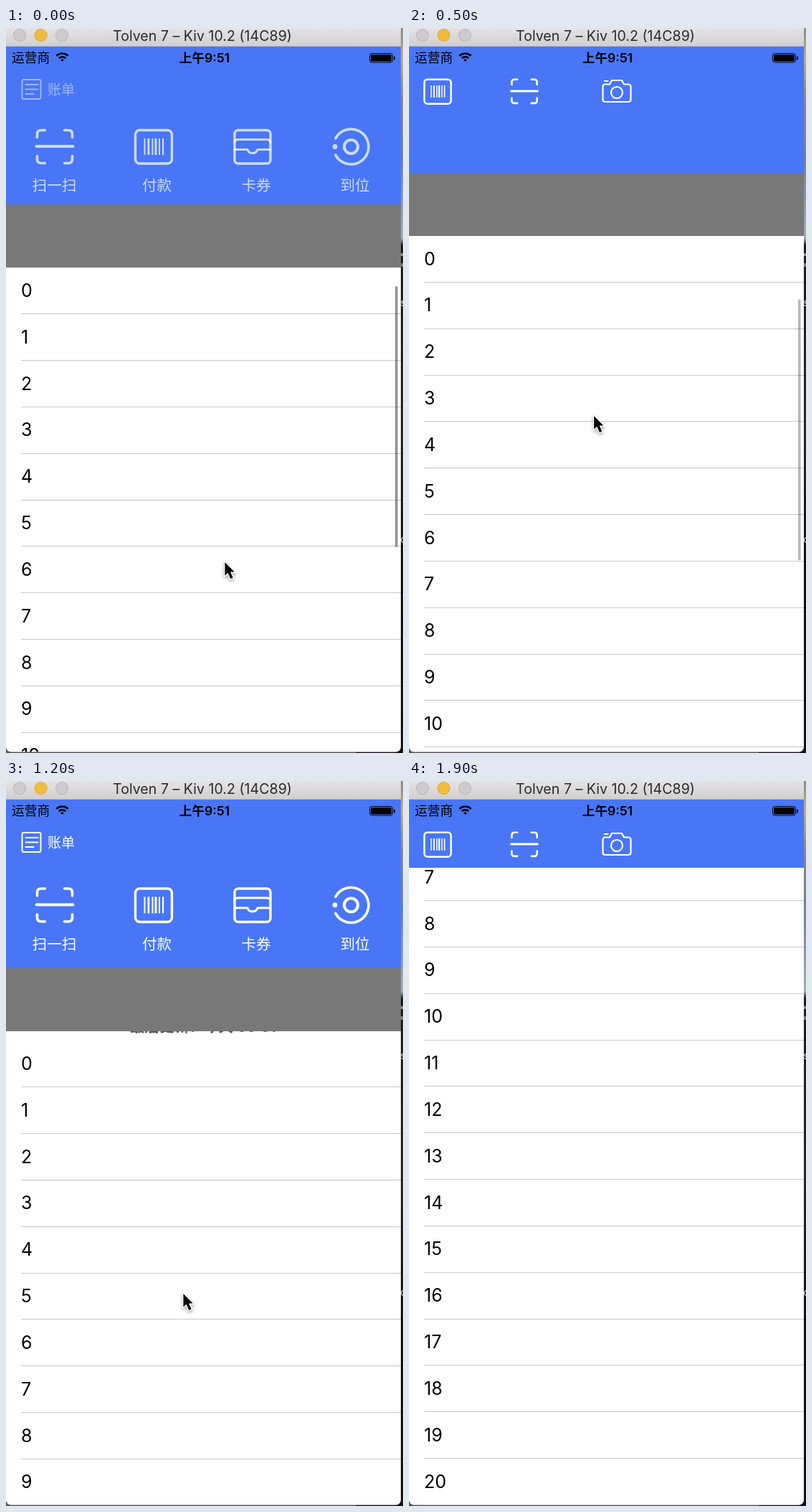
An HTML page with a canvas that plays this animation: 554 by 1011 pixels, repeating every 2 s.

```html
<!DOCTYPE html>
<html lang="zh-CN">
<head>
<meta charset="utf-8">
<style>
  html, body { margin: 0; width: 554px; height: 1011px; overflow: hidden; background: #111; }
  canvas { display: block; }
</style>
</head>
<body>
<canvas id="stage" width="554" height="1011"></canvas>
<script>
const c = document.getElementById('stage').getContext('2d');
const FAMILY = 'Inter, "Noto Sans CJK SC", "Noto Sans CJK", sans-serif';
const BLUE = '#4876f6', WIDTH = 551, ROW = 64.83;
const NAV_BOTTOM = 121, HEADER_BOTTOM = 261, LIST_TOP = 349;
const STEP = 100, STEPS = 20;

// step, scroll offset, pointer x, pointer y, scrollbar opacity
const KEYS = [
  [0, 15, 305, 744, .42], [2, 113, 308, 652, .2], [4, 89, 263, 577, .42],
  [7, 0, 247, 466, 0], [10, -40, 247, 690, 0], [12, -13, 247, 714, 0],
  [15, 705.5, 275, 508, .42], [18, 701, 275, 508, .15], [19, 701, 275, 508, 0]
];

function poseAt(step) {
  const i = Math.max(1, KEYS.findIndex(k => k[0] >= step));
  const a = KEYS[i - 1], b = KEYS[i], f = (step - a[0]) / (b[0] - a[0]);
  return a.map((v, n) => v + (b[n] - v) * f);
}

function rect(x, y, w, h, color) {
  c.fillStyle = color;
  c.fillRect(x, y, w, h);
}

function text(str, x, y, size, color, align = 'left', weight = 400) {
  c.font = `${weight} ${size}px ${FAMILY}`;
  c.textAlign = align;
  c.fillStyle = color;
  c.fillText(str, x, y);
}

function disc(x, y, r, color) {
  c.fillStyle = color;
  c.beginPath();
  c.arc(x, y, r, 0, 7);
  c.fill();
}

function box(x, y, w, h, r) {
  c.beginPath();
  c.roundRect(x, y, w, h, r);
}

function stroke(path, width) {
  c.lineWidth = width;
  c.stroke(new Path2D(path));
}

function clipped(x, y, w, h, draw) {
  c.save();
  c.beginPath();
  c.rect(x, y, w, h);
  c.clip();
  draw();
  c.restore();
}

// Icons are drawn around their own centre.
function icon(draw, x, y, scale = 1) {
  c.save();
  c.translate(x, y);
  c.scale(scale, scale);
  c.strokeStyle = c.fillStyle = '#fff';
  c.lineCap = c.lineJoin = 'round';
  draw();
  c.restore();
}

function scanIcon() {
  stroke('M-25.5 -.5H25.5', 4);
  for (const [sx, sy] of [[1, 1], [-1, 1], [1, -1], [-1, -1]]) {
    c.save();
    c.scale(sx, sy);
    stroke('M13.5 23H19Q24.5 23 24.5 17.5V13', 3.6);
    c.restore();
  }
}

function payIcon() {
  c.lineWidth = 3.4;
  box(-25.5, -23, 51, 46.5, 6);
  c.stroke();
  [[-13.5, 2], [-8.5, 2.8], [-2.5, 2], [1.5, 3], [7, 2], [12, 2.2]].forEach(([x, w]) => c.fillRect(x, -11.5, w, 23));
}

function cardIcon() {
  c.lineWidth = 3.4;
  box(-25, -23, 50, 46.5, 5);
  c.stroke();
  stroke('M-25 -6Q-24 -10 -20 -10H20Q24 -10 25 -6M-25 4H-7Q-5.5 9 0 9Q5.5 9 7 4H25', 3);
}

function placeIcon() {
  c.lineWidth = 3.6;
  c.beginPath();
  c.arc(0, 0, 24.5, -2.65, 2.65);
  c.stroke();
  c.lineWidth = 4;
  c.beginPath();
  c.arc(0, 0, 9.5, 0, 7);
  c.stroke();
  disc(-22.5, 0, 3.4, '#fff');
}

function billIcon() {
  c.lineWidth = 2;
  box(-13, -13.5, 26, 27, 2);
  c.stroke();
  stroke('M-8 -6.5H9M-8 0H9M-8 6.5H3', 2);
}

function cameraIcon() {
  stroke('M-16 -10H-10L-7 -15.5H7L10 -10H16Q19.5 -10 19.5 -6.5V11Q19.5 14.5 16 14.5H-16' +
    'Q-19.5 14.5 -19.5 11V-6.5Q-19.5 -10 -16 -10ZM-17 -14.5H-12.5', 2.2);
  c.beginPath();
  c.arc(0, 1.5, 8, 0, 7);
  c.stroke();
}

const ACTIONS = [
  [scanIcon, 68, '扫一扫', 67.5], [payIcon, 206, '付款', 210.5],
  [cardIcon, 344, '卡券', 349], [placeIcon, 481.5, '到位', 487]
];

function drawDesktop() {
  const g = c.createLinearGradient(0, 0, 0, 1011);
  [[0, '#8b8b90'], [.04, '#c2ab80'], [.1, '#8a8684'], [.18, '#71809c'], [.29, '#a3abb8'],
   [.3, '#1c1c20'], [.55, '#26262a'], [.75, '#101016'], [1, '#15131a']].forEach(s => g.addColorStop(...s));
  rect(0, 0, 554, 1011, g);
  rect(0, 1006, 488, 5, '#55555a');
  rect(551, 314, 3, 4, '#8c8c8c');
  rect(551, 328, 3, 5, '#777');
  text('s', 550.5, 388, 13, '#ddd');
  text('c', 550.5, 718, 13, '#ddd');
}

function drawTitleBar() {
  const g = c.createLinearGradient(0, 0, 0, 26);
  g.addColorStop(0, '#e5e3e5');
  g.addColorStop(1, '#d0ced0');
  rect(0, 0, WIDTH, 26, g);
  rect(0, 25, WIDTH, 1, '#b5b3b5');
  [[19, '#cdcbcd', '#b4b2b4'], [48.5, '#f0bb41', '#dba634'], [78, '#cdcbcd', '#b4b2b4']].forEach(([x, fill, edge]) => {
    disc(x, 10, 9, edge);
    disc(x, 10, 8.2, fill);
  });
  text('Tolven 7 – Kiv 10.2 (14C89)', 274, 18, 19.6, '#2c2b2c', 'center');
}

function drawStatusBar() {
  text('运营商', 8, 48, 17.7, '#000');
  c.strokeStyle = '#000';
  c.lineCap = 'butt';
  c.lineWidth = 2.6;
  for (const r of [2, 6.8, 11.5]) {
    c.beginPath();
    c.arc(78.5, 47, r, -Math.PI * .75, -Math.PI * .25);
    c.stroke();
  }
  text('上午9:51', 277, 48, 17.6, '#000', 'center', 600);
  c.lineWidth = 1;
  box(507.5, 35.5, 32, 12.5, 3);
  c.stroke();
  c.fillStyle = '#000';
  box(509, 37, 29, 9.5, 1.5);
  c.fill();
  box(541, 39.5, 2, 5, 1);
  c.fill();
}

function drawSpinner(x, y, step) {
  c.save();
  c.translate(x, y);
  c.lineCap = 'round';
  for (let i = 0; i < 12; i++) {
    const shade = 145 + 8 * ((i + step * 5 + 9) % 12);
    c.strokeStyle = `rgb(${shade},${shade},${shade})`;
    c.save();
    c.rotate(-i * Math.PI / 6);
    stroke('M0 -8V-13.2', 2.6);
    c.restore();
  }
  c.restore();
}

function drawList(scroll, step) {
  const top = LIST_TOP - scroll;
  const ceiling = Math.max(NAV_BOTTOM, Math.round(Math.min(LIST_TOP, top)));
  clipped(0, ceiling, WIDTH, 1011 - ceiling, () => {
    rect(0, ceiling, WIDTH, 1011, '#fff');
    if (scroll < 0) text('最后更新：今天 09:51', 275, top - 12, 20.6, '#555', 'center', 600);
    for (let i = 0; i <= 21; i++) {
      const y = top + i * ROW;
      if (y > 1011) break;
      if (i === 20 && step < 19) {
        drawSpinner(127, y + 32, step);
        text('正在加载更多的数据...', 275, y + 39.5, 20.6, '#555', 'center', 600);
      } else {
        text(i, 21, y + 41, 25, '#000');
      }
      rect(21, Math.round(y + ROW - .6), WIDTH - 21, 1, '#c8c7cc');
    }
  });
}

function drawHeader(scroll) {
  const shift = Math.max(0, scroll);
  const bottom = Math.max(NAV_BOTTOM, Math.round(HEADER_BOTTOM - shift));
  rect(0, 26, WIDTH, bottom - 26, BLUE);
  const fade = Math.max(0, 1 - shift / 56);

  clipped(0, NAV_BOTTOM, WIDTH, bottom - NAV_BOTTOM, () => {
    c.globalAlpha = fade;
    for (const [draw, x, label, labelX] of ACTIONS) {
      icon(draw, x, 173 - shift / 2);
      text(label, labelX, 234.5 - shift / 2, 20.6, '#fff', 'center');
    }
  });

  c.globalAlpha = Math.max(0, fade * 2 - 1);
  icon(billIcon, 35.5, 85.5);
  text('账单', 58, 92.5, 19, '#fff');

  c.globalAlpha = Math.max(0, 1 - fade * 2);
  icon(payIcon, 40, 88.5, .73);
  icon(scanIcon, 161, 88.3, .72);
  icon(cameraIcon, 290, 88.5);
  c.globalAlpha = 1;
}

function drawPointer(x, y) {
  const arrow = new Path2D('M0 0V18.5L4.2 14.7L7.8 23L11.2 21.5L7.6 13.6H13.2Z');
  c.save();
  c.translate(x + .5, y + 1);
  c.shadowColor = 'rgba(0,0,0,.4)';
  c.shadowBlur = 4;
  c.shadowOffsetY = 2;
  c.strokeStyle = '#fff';
  c.lineWidth = 2.6;
  c.stroke(arrow);
  c.shadowColor = 'transparent';
  c.fillStyle = '#000';
  c.fill(arrow);
  c.restore();
}

function draw(step) {
  const [, scroll, x, y, barAlpha] = poseAt(step);
  drawDesktop();
  c.save();
  box(0, -10, WIDTH, 1019.5, 7);
  c.clip();
  rect(0, 26, WIDTH, 985, '#787878');
  drawList(scroll, step);
  drawHeader(scroll);
  drawStatusBar();
  drawTitleBar();
  const barTop = 353.8 + .4145 * scroll;
  c.fillStyle = `rgba(0,0,0,${barAlpha})`;
  box(543, barTop, 3.6, Math.min(364, 1005 - barTop), 1.8);
  c.fill();
  c.restore();
  if (step < 19) drawPointer(x, y);
}

function tick() {
  draw(Math.floor(performance.now() / STEP) % STEPS);
  requestAnimationFrame(tick);
}
tick();
</script>
</body>
</html>
```
